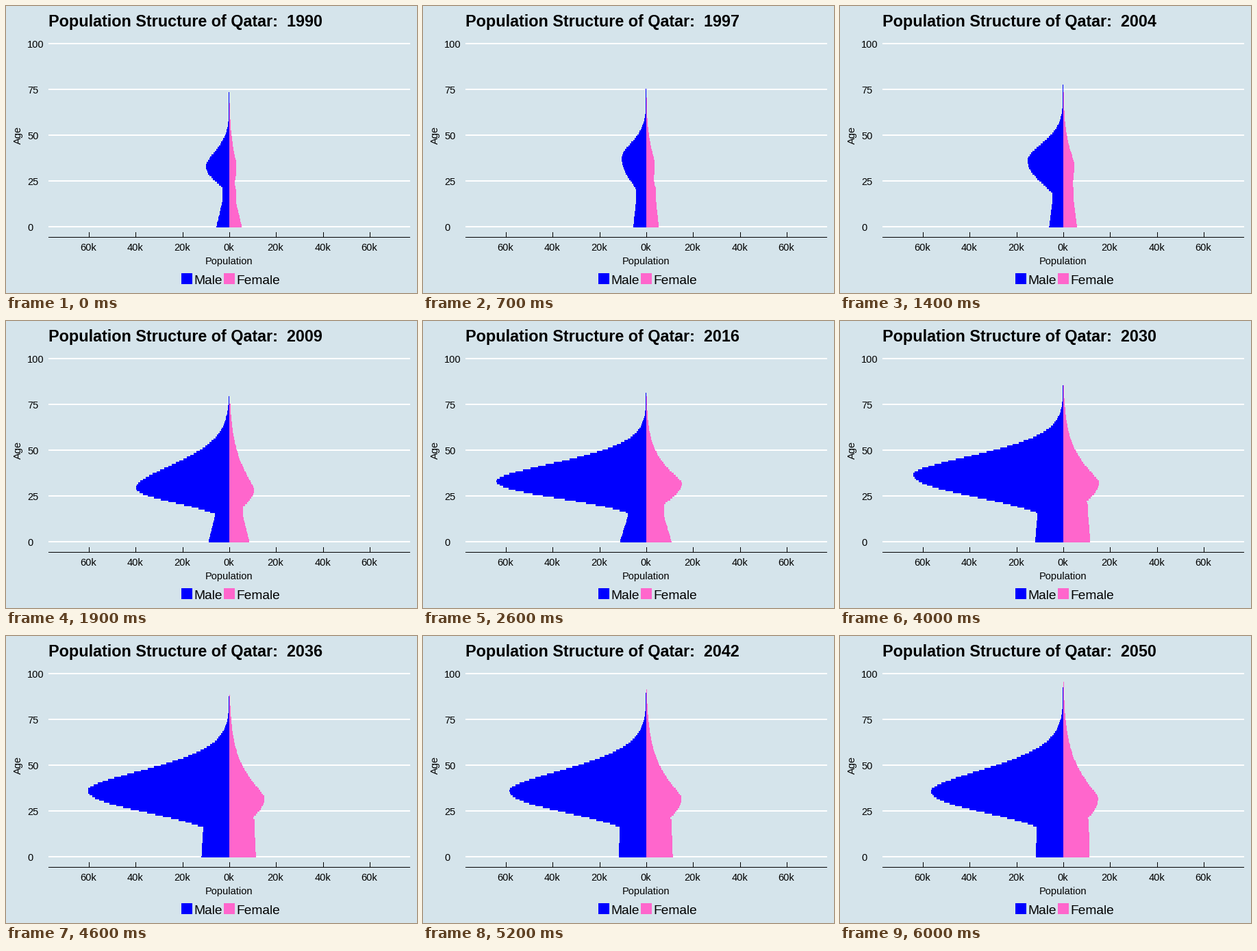
Animation of 600x420 px, one loop 6700 ms. Source, as a matplotlib script:

```python
import numpy as np
import matplotlib.pyplot as plt
from matplotlib.animation import FuncAnimation
from matplotlib.patches import Rectangle

W, H, DPI = 600, 420, 100
BG, BLUE, PINK = "#d5e4eb", "#0000ff", "#ff66cc"
X0, Y0 = 326, 323                  # zero population, age zero
YEAR_PX, POP_PX = 2.68, 68.3       # one year of age, 20k people
START, YEARS, HOLD = 1990, 60, 6   # the last year stays on for a while

plt.rcParams["font.family"] = "Liberation Sans"

AGES = np.arange(98)
EDGES = np.round(Y0 + YEAR_PX * (0.5 - np.arange(99)))
keys = {}


def key(year, children, male, female, ease=1, surge=0):
    """children: width at birth and at 14; male, female: age and width of the
    peak, spread below and above it; ease, surge: change until the next key."""
    keys[year] = np.array(children + male + female, float), ease, surge


key(1990, (19, 10), (33, 34, 10.8, 12.5), (34, 10.5, 16.5, 14))
key(1997, (19, 15), (38, 36, 18.5, 12), (36, 12, 30, 13), ease=3.4)
key(2009, (30.5, 21), (29.8, 136.5, 11.3, 18.6), (29, 36.5, 12.5, 18), ease=.73)
key(2016, (38.5, 27), (33.4, 219, 12.9, 14.7), (32.5, 52, 14, 13.5), surge=15)
key(2030, (41, 38), (37, 219, 16.7, 15.2), (33, 52, 15.8, 16), ease=.6)
key(2050, (40, 39), (36, 193, 16, 17.6), (32.5, 51, 18, 18.5))


def shape(birth, teen, bulge, bend):
    """Even slope of children joined to a lopsided bell of adults."""
    age, peak, young, old = bulge
    d = AGES - age
    bell = peak * np.where(d < 0, np.exp(-np.abs(d / young) ** 2.3),
                           np.exp(-np.abs(d / old) ** bend))
    children = birth + (teen - birth) * np.minimum(AGES / 14, 1)
    return np.maximum(children * np.clip((40 - AGES) / 20, 0, 1), bell)


def population(n):
    """Whole-pixel bar widths of both sexes, n years after the start."""
    years = sorted(keys)
    k = min(np.searchsorted(years, START + n, "right") - 1, len(years) - 2)
    a, b = years[k], years[k + 1]
    values, ease, surge = keys[a]
    t = (START + n - a) / (b - a)
    p = values + (keys[b][0] - values) * t ** ease
    p[3] += surge * np.sin(np.pi * t)
    male = shape(p[0], p[1], p[2:6], 1.7)
    female = shape(.96 * p[0], .96 * p[1], p[6:], 1.2)
    return clip_tip(male, 73.5 + .317 * n), clip_tip(female, 67.5 + .467 * n)


def clip_tip(widths, oldest):
    return np.where(AGES + .5 <= oldest, np.maximum(np.round(widths), 1), 0)


fig = plt.figure(figsize=(W / DPI, H / DPI), dpi=DPI, facecolor=BG)
ax = fig.add_axes([0, 0, 1, 1])
ax.axis("off")


def box(x, y, w, h, color):
    ax.add_patch(Rectangle((x, y), w, h, fc=color, lw=0, antialiased=False))


def label(x, y, text, px=14.6, **kw):
    return ax.text(x, y, text, fontsize=px * 72 / DPI, va="baseline", color="black", **kw)


for n in range(5):
    y = Y0 - 67 * n
    box(62, y - 1, 528, 2, "white")
    label(31, y + 6, str(25 * n))

box(62, 338, 528, 1, "black")
for n in range(-3, 4):
    x = round(X0 + POP_PX * n)
    box(x, 331, 1, 7, "black")
    label(x - .5, 358, f"{abs(n) * 20}k", ha="center")

label(X0, 378, "Population", ha="center")
label(21.5, 189, "Age", ha="center", rotation=90, rotation_mode="anchor")
for x, color, text in ((256, BLUE, "Male"), (318, PINK, "Female")):
    box(x, 391, 16, 16, color)
    label(x + 18.5, 407, text, 19.2)

title = label(62, 30, "", 23.35, weight="bold")


def pyramid_side(color):
    return ax.stairs(np.full(len(AGES), X0), EDGES, baseline=X0, fill=True, lw=0,
                     orientation="horizontal", color=color, antialiased=False, zorder=3)


male_bars, female_bars = map(pyramid_side, (BLUE, PINK))
ax.set_xlim(0, W)
ax.set_ylim(H, 0)


def draw(i):
    n = min(i, YEARS)
    male, female = population(n)
    male_bars.set_data(X0 - male)
    female_bars.set_data(X0 + female)
    title.set_text(f"Population Structure of Qatar:  {START + n}")
    return male_bars, female_bars, title


anim = FuncAnimation(fig, draw, frames=YEARS + 1 + HOLD, interval=100,
                     repeat=True, repeat_delay=0)
plt.show()
```
